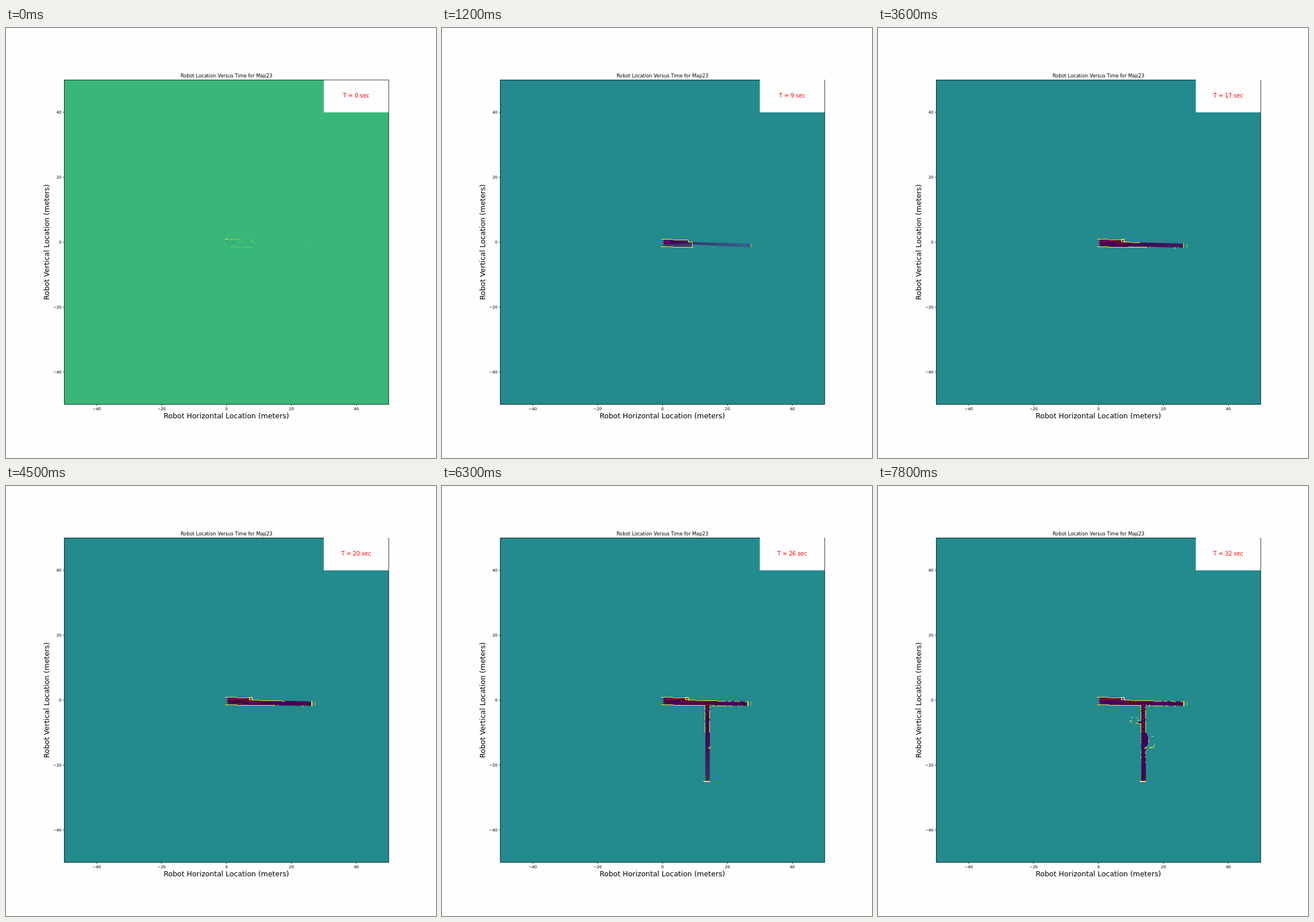
These frames come from a looping animation (748 by 748 pixels, 8000 ms). An HTML page with a canvas:

```html
<!DOCTYPE html>
<html lang="en">
<head>
<meta charset="utf-8">
<title>Robot location</title>
<style>
html, body { margin: 0; width: 100%; height: 100%; overflow: hidden; background: #fefefe; }
canvas, svg { position: absolute; left: 0; top: 0; width: 748px; height: 748px; }
text { font-family: "DejaVu Sans", Verdana, sans-serif; text-anchor: middle; }
path { fill: none; stroke: #000; stroke-width: .75; }
.title { font-size: 8.31px; }
.label { font-size: 12.47px; }
.tick { font-size: 6.93px; }
.clock { font-size: 9.7px; fill: #f00; }
</style>
</head>
<body>
<canvas id="map" width="748" height="748"></canvas>
<svg id="axes" viewBox="0 0 748 748">
  <rect x="552.8" y="89" width="113" height="57.7" fill="#fefefe"/>
  <path d="M552.8 90.4H101.4V654.8H665.8V90"/>
  <path id="lid" d="M552 90.4H666"/>
  <text class="title" x="383.5" y="86">Robot Location Versus Time for Map23</text>
  <text class="label" x="383.3" y="679">Robot Horizontal Location (meters)</text>
  <text class="label" transform="translate(75.2 372.5) rotate(-90)">Robot Vertical Location (meters)</text>
  <text class="clock" id="clock" x="609.2" y="120.8">T = 0 sec</text>
</svg>
<script>
const STEP = 300, LOOP = 8000;
const YELLOW = '#fde725', LIME = '#a0da39', DARK = '#440154', BLUE = '#33638d';
const TEAL = '#238a8d', GREEN = '#38b779';
const ROOM_END = 429, WEST = 458, EAST = 466, CORRIDOR_END = 514;
const get = id => document.getElementById(id);
const ctx = get('map').getContext('2d');

const mix = (a, b, t) => a + (b - a) * t;
const ramp = (k, a, b) => Math.max(0, Math.min(1, (k - a) / (b - a)));
const random = n => Math.abs(Math.sin(n * 12.9898) * 43758.5453) % 1;

// hall walls: y for a given x
const roof = x => 367.2 + (x - 381) * .015;
const ceiling = x => 372.2 + (x - ROOM_END) * .027;
const floor = x => 380.2 + (x - 381) * .016;

// robot route: step, x, y
const route = [[1, 385, 372], [8, 407, 370.5], [13, 429, 377], [18, 460, 377], [20, 463, 385], [26, 460.5, 426]];

function robot(k) {
  const i = Math.max(1, route.findIndex(p => p[0] >= k));
  const [a, x1, y1] = route[i - 1], [b, x2, y2] = route[i];
  const t = ramp(k, a, b);
  return [mix(x1, x2, t), mix(y1, y2, t) + .6 * Math.sin(k * 2)];
}

function box(x, y, w, h, color = YELLOW) {
  ctx.fillStyle = color;
  ctx.fillRect(Math.round(x), Math.round(y), w, h);
}

// area between two curves of x
function fill(top, low, a, b, color, alpha = 1) {
  ctx.globalAlpha = alpha;
  ctx.fillStyle = color;
  ctx.beginPath();
  ctx.moveTo(a, top(a));
  ctx.lineTo(b, top(b));
  ctx.lineTo(b, low(b));
  ctx.lineTo(a, low(a));
  ctx.fill();
  ctx.globalAlpha = 1;
}

function fade(x1, y1, x2, y2, from, to) {
  const g = ctx.createLinearGradient(x1, y1, x2, y2);
  g.addColorStop(0, from);
  g.addColorStop(1, to);
  return g;
}

const dark = alpha => `rgba(68,1,84,${alpha})`;
const slope = (x1, y1, x2, y2) => x => mix(y1, y2, (x - x1) / (x2 - x1));

// wall of short pieces, some missing
function wall(curve, a, b, density = 1, color = YELLOW) {
  for (let x = a; x < b; x += 3) {
    if (random(x) < density) box(x, curve(x), Math.min(3, b - x), 1, color);
  }
}

function post(x, a, b, density = 1, color = YELLOW) {
  for (let y = a; y < b; y += 3) {
    if (random(x + y) < density) box(x, y, 1, Math.min(3, b - y), color);
  }
}

// scattered echoes around an oval room
function echoes(cx, cy, rx, ry, count, seed) {
  for (let i = 0; i < count; i++) {
    const a = random(seed + i) * 2 * Math.PI;
    box(cx + rx * Math.cos(a), cy + ry * Math.sin(a), 1 + 2 * random(seed - i), 1);
  }
}

function firstScan() {
  wall(roof, 381, 387);
  wall(roof, 387, 417, .6, '#8fd744');
  wall(floor, 381, 429, .8, '#6ece58');
  post(428, 368, 373, .8, LIME);
  wall(() => 373, 387, 399, .6, TEAL);
  box(519, 382, 1, 1, '#8fd744');
}

function hall(k) {
  const far = k < 11 ? 537 : 532;
  const room = ramp(k, 1, 7), clear = ramp(k, 4, 15);

  fill(slope(386, 371.5, 537, 375), slope(386, 374, 537, 382), 386, far, BLUE, .9);
  fill(roof, floor, 384, ROOM_END, BLUE, mix(.25, .8, room));
  fill(slope(386, 369, 440, 373), slope(386, 376, 440, 374), 386, 440, DARK);
  fill(roof, floor, 385, ROOM_END, fade(384, 0, 392, 0, dark(.4), DARK), room);
  fill(ceiling, floor, ROOM_END, 436, DARK, room);
  const low = x => mix(slope(ROOM_END, 376, 537, 382)(x), floor(x), clear);
  fill(ceiling, low, 436, far, fade(436, 0, 530, 0, DARK, dark(mix(.05, 1, clear))), room);

  wall(roof, 381, ROOM_END);
  post(428, 368, 373, mix(.7, 1, room));
  wall(floor, 381, k > 18 ? WEST : mix(430, 467, ramp(k, 2, 12)));
  if (k > 3 && k < 11) {
    wall(() => 372, ROOM_END, 436);
    post(435, 372, 381);
  }
  if (k > 6 && k < 10) post(423, 368, 380, .7, '#6ece58');
  if (k > 9) {
    ctx.strokeStyle = YELLOW;
    ctx.lineWidth = 1.4;
    ctx.strokeRect(423.5, 368, 5, 3.6);
  }
  if (k > 10) wall(ceiling, ROOM_END, mix(456, 485, ramp(k, 12, 15)));
  if (k > 15) {
    wall(ceiling, 485, mix(495, 530, ramp(k, 15, 21)), .75);
    wall(floor, EAST, 505, .85);
  }

  post(537, 375, 382, 1, LIME);
  post(472, 380, 382, 1, LIME);
  post(521, 381, 383, 1, LIME);
  if (k > 10) {
    box(531, 374, k > 14 ? 2 : 1, 9);
    post(516, 381, 384);
    post(466, 380, 383);
  }
  box(363, 395, 1, 1, '#3aa676');
  box(374, 394, 2, 1, '#3aa676');
}

function corridor(k) {
  const clear = ramp(k, 18, 26), end = mix(405, 430, ramp(k, 19, 21));
  const shade = fade(0, 425, 0, 512, DARK, dark(mix(.15, .95, clear)));
  ctx.globalAlpha = .85;
  box(WEST, 430, 8, 84, BLUE);
  ctx.globalAlpha = 1;
  box(WEST, 381, 8, CORRIDOR_END - 381, shade);
  post(461, 430, 512, 1, DARK);
  post(WEST - 1, 381, end, .85, '#dfe318');
  post(EAST - 1, 381, end, .75);
  box(454, CORRIDOR_END - 1, 13, 1);
  box(456, CORRIDOR_END, 10, 1);
  box(464, 454, 4, 1);
  box(463, 456, 4, 1);
  box(350, 374, 2, 1, '#3aa676');
}

function sideRooms(k) {
  const seen = ramp(k, 21, 26);
  ctx.fillStyle = DARK;
  ctx.beginPath();
  ctx.ellipse(EAST, 442, 4 * seen, 12, 0, 0, 7);
  ctx.fill();
  box(452, 410, 6, 3, DARK);
  wall(() => 413, 451, WEST);
  echoes(445, 407, 7, 6, Math.round(15 * seen), 4);
  echoes(475, 445, 5, 10, Math.round(11 * seen), 40);
  wall(() => 455, 472, 480);
  post(WEST - 1, 430, 480, .4, LIME);
  post(EAST - 1, 455, 487, .3, LIME);
}

function trail(k) {
  ctx.fillStyle = '#f00';
  for (let i = k ? 1 : 0; i <= k; i++) {
    ctx.beginPath();
    ctx.arc(...robot(i), 1, 0, 7);
    ctx.fill();
  }
}

function draw(k) {
  box(101, 90, 565, 565, k ? TEAL : GREEN);
  if (k) hall(k);
  else firstScan();
  if (k > 18) corridor(k);
  if (k > 21) sideRooms(k);
  trail(k);
  const sec = k && k + (k > 23 ? 6 : 5);
  get('clock').textContent = `T = ${sec} sec`;
  get('lid').style.opacity = k ? 0 : 1;
}

function addSvg(tag, attrs, text = '') {
  const el = document.createElementNS('http://www.w3.org/2000/svg', tag);
  for (const name in attrs) el.setAttribute(name, attrs[name]);
  el.textContent = text;
  get('axes').append(el);
}

for (let m = -40; m <= 40; m += 20) {
  const x = 383.6 + m * 5.644, y = 372.5 - m * 5.644;
  const name = String(m).replace('-', '\u2212');
  addSvg('path', { d: `M${x} 654.8v2.5M101.4 ${y}h-2.5` });
  addSvg('text', { class: 'tick', x, y: 664.8 }, name);
  addSvg('text', { class: 'tick', x: 96.5, y: y + 2.5, style: 'text-anchor:end' }, name);
}

let last = -1;
function tick() {
  const k = Math.floor(performance.now() % LOOP / STEP);
  if (k !== last) draw(last = k);
  requestAnimationFrame(tick);
}
tick();
</script>
</body>
</html>
```
